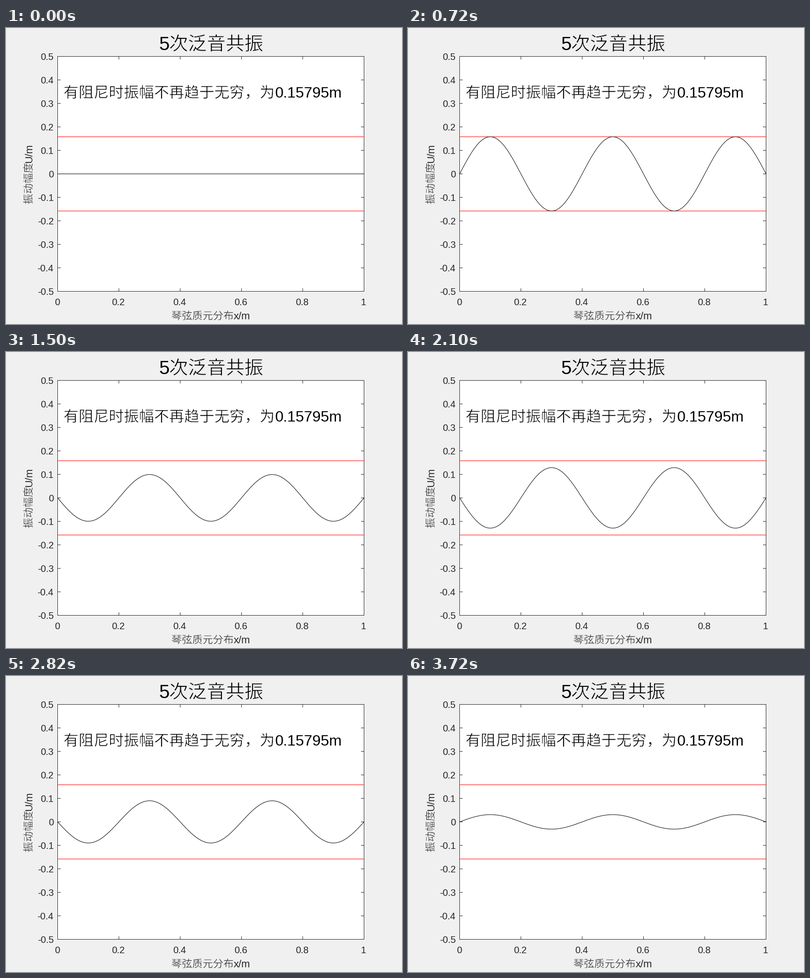
A matplotlib script for the animation above (3780 ms loop, 840 by 630 pixels).

```python
import numpy as np
import matplotlib.pyplot as plt
from matplotlib.animation import FuncAnimation
from matplotlib.patches import Rectangle
from matplotlib.patheffects import Stroke

W, H = 840, 630
PT = 0.72  # points per pixel at 100 dpi
LEFT, RIGHT, TOP, BOTTOM = 109.5, 759.5, 60.5, 560.5
MID = (TOP + BOTTOM) / 2
UNIT = BOTTOM - TOP

FRAMES, INTERVAL = 63, 60
AMPLITUDE = 0.15795
STEP = 0.65555  # phase advance per frame
MODE = 5

PAPER, INK, LIMIT = "#f0f0f0", "#262626", "#ff0000"

fig = plt.figure(figsize=(W / 100, H / 100), dpi=100, facecolor=PAPER)
ax = fig.add_axes([0, 0, 1, 1])
ax.set_xlim(0, W)
ax.set_ylim(H, 0)
ax.axis("off")


def line(xs, ys, color, z=2):
    # coordinates already sit on pixel centres, so no snapping
    return ax.plot(xs, ys, color=color, lw=PT, zorder=z, snap=False,
                   solid_capstyle="projecting", solid_joinstyle="miter")[0]


def latin(x, y, s, size, color, **kw):
    return ax.text(x, y, s, fontsize=size * PT, color=color,
                   family="Liberation Sans", va="baseline", **kw)


def chinese(x, y, s, size, color, back, **kw):
    # a thin background-coloured edge slims the strokes
    slim = Stroke(linewidth=0.022 * size * PT, foreground=back)
    return ax.text(x, y, s, fontsize=size * PT, color=color,
                   family="Noto Sans CJK JP", va="baseline",
                   path_effects=[slim], **kw)


def y_of(u):
    return MID - UNIT * u


def draw_axes():
    ax.add_patch(Rectangle((LEFT, TOP), RIGHT - LEFT, UNIT,
                           fc="white", ec="none", zorder=0, snap=False))
    line([LEFT, RIGHT, RIGHT, LEFT, LEFT],
         [TOP, TOP, BOTTOM, BOTTOM, TOP], INK)
    tick = 6
    for i in range(6):
        x = LEFT + i * (RIGHT - LEFT) / 5
        line([x, x], [BOTTOM, BOTTOM - tick], INK)
        line([x, x], [TOP, TOP + tick], INK)
        latin(x - 1, 590, f"{i / 5:g}", 20, INK, ha="center")
    for i in range(-5, 6):
        y = y_of(i / 10)
        line([LEFT, LEFT + tick], [y, y], INK)
        line([RIGHT, RIGHT - tick], [y, y], INK)
        latin(101, y + 7.5, f"{i / 10:g}", 20, INK, ha="right")


def draw_labels():
    latin(324, 47, "5", 40, "black")
    chinese(346, 47, "次泛音共振", 40, "black", PAPER)

    latin(571, 148, f"{AMPLITUDE}m", 32, "black")
    chinese(122, 148, "有阻尼时振幅不再趋于无穷，为", 32, "black", "white")

    chinese(351, 620, "琴弦质元分布", 22, INK, PAPER)
    latin(483, 620, "x/m", 22, INK)

    upright = dict(rotation=90, rotation_mode="anchor", ha="left")
    chinese(55, 375, "振动幅度", 22, INK, PAPER, **upright)
    latin(55, 287, "U/m", 22, INK, **upright)


draw_axes()
draw_labels()
for sign in (1, -1):
    y = np.floor(y_of(sign * AMPLITUDE)) + 0.5
    line([LEFT, RIGHT], [y, y], LIMIT, 3)

s = np.linspace(0, 1, 301)
shape = AMPLITUDE * np.sin(MODE * np.pi * s)
string = line(LEFT + s * (RIGHT - LEFT), y_of(0 * s), "black", 4)


def update(n):
    string.set_ydata(y_of(shape * np.sin(STEP * n)))
    return (string,)


anim = FuncAnimation(fig, update, frames=FRAMES, interval=INTERVAL,
                     repeat=True, repeat_delay=0, blit=False)
plt.show()
```
